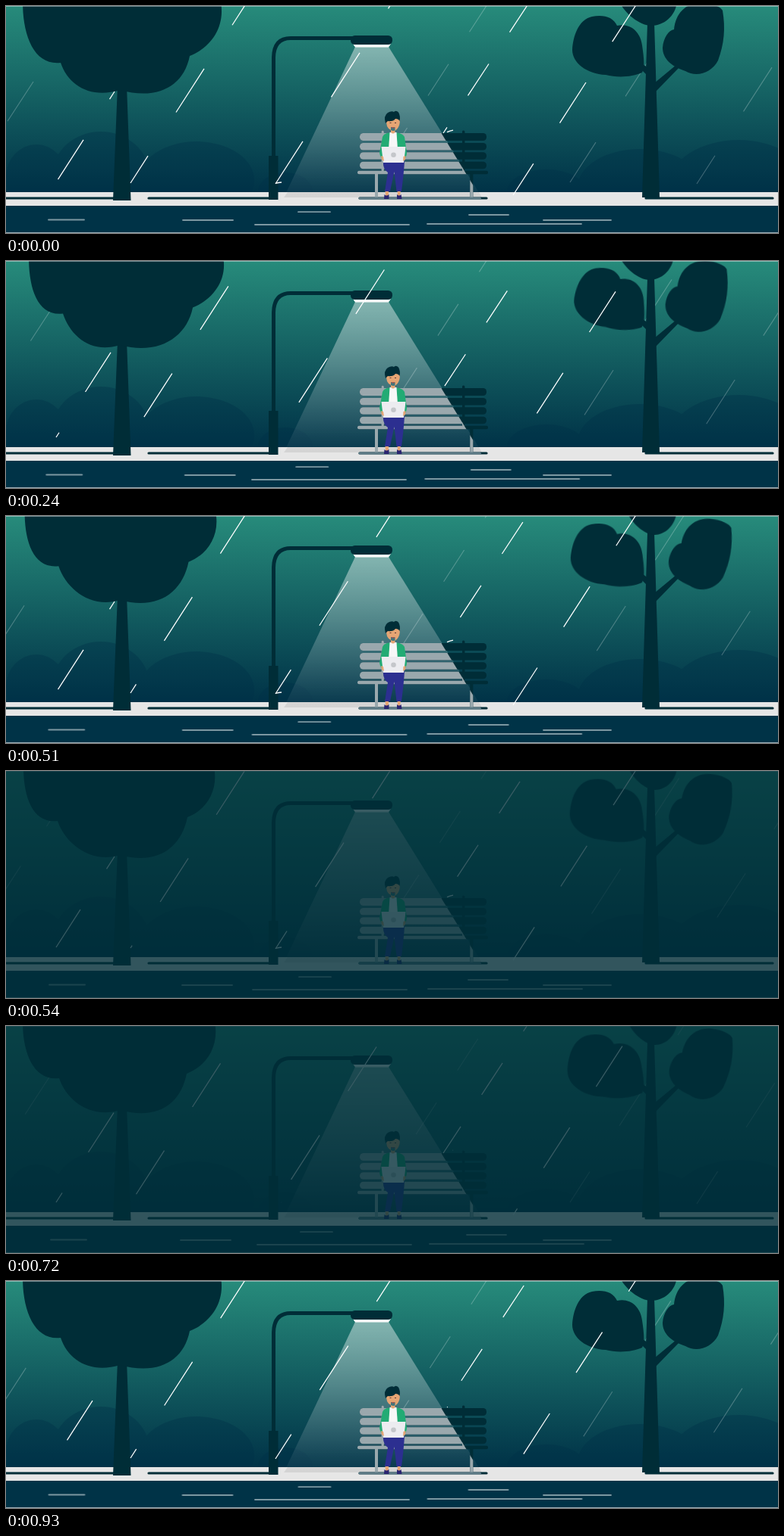
An HTML page for the animation above (960 ms loop, 1017 by 300 pixels).

```html
<!DOCTYPE html>
<html lang="en">
<head>
<meta charset="utf-8">
<title>Rainy evening on a bench</title>
<style>
  html, body { margin: 0; width: 100%; height: 100%; overflow: hidden; background: #003347; }
  svg { display: block; width: 100vw; height: 100vh; }
  .dark { fill: #002d37; }
  .post { fill: none; stroke: #002d37; }
  .bush { fill: #003148; opacity: .38; }

  .drop { fill: none; stroke: #fff; stroke-width: 1.25; animation: fall 960ms steps(32) infinite; }
  .faint .drop { stroke-opacity: .25; stroke-width: 1.1; }
  @keyframes fall { from { stroke-dashoffset: var(--from); } to { stroke-dashoffset: var(--to); } }

  .splash { fill: none; stroke: #fff; stroke-width: 1.3; stroke-dasharray: 9 100; animation: splash 960ms linear infinite; }
  @keyframes splash {
    0%, 50%, 62.5% { stroke-dashoffset: 0; }
    3.1%, 65.6% { stroke-dashoffset: -2; }
    12.5%, 75% { stroke-dashoffset: -8; }
    16%, 78% { stroke-dashoffset: -9; }
    16.01%, 31%, 78.01%, 94% { stroke-dashoffset: 9; }
    37.5% { stroke-dashoffset: 6; }
    96.9%, 99.9% { stroke-dashoffset: 8.2; }
    100% { stroke-dashoffset: 0; }
  }

  .leaf { animation: 960ms linear infinite; }
  #leafLeft { transform-origin: 840px 80px; animation-name: leafLeft; }
  @keyframes leafLeft {
    0%, 96.9%, 100% { transform: rotate(0deg) scale(1); }
    12.5% { transform: rotate(2deg) scale(1); }
    37.5% { transform: rotate(6.5deg) scale(.99); }
    56.25% { transform: rotate(0deg) scale(1.035); }
    65.6%, 75% { transform: rotate(-2deg) scale(1.06); }
  }
  #leafTop { transform-origin: 850px 26px; animation-name: leafTop; }
  @keyframes leafTop {
    0%, 96.9%, 100% { transform: translate(0, 0) scaleX(1); }
    12.5% { transform: translate(-4px, 0) scaleX(1); }
    37.5% { transform: translate(-1px, -2px) scaleX(.9); }
    56.25%, 65.6%, 75% { transform: translate(5px, -1px) scaleX(.87); }
  }
  #leafRight { transform-origin: 880px 85px; animation-name: leafRight; }
  @keyframes leafRight {
    0%, 96.9%, 100% { transform: translate(0, 0) rotate(0deg); }
    12.5% { transform: translate(1px, 1px) rotate(.8deg); }
    37.5% { transform: translate(4px, 4px) rotate(3.5deg); }
    56.25% { transform: translate(6px, 5px) rotate(4.5deg); }
    65.6%, 75% { transform: translate(6px, 4px) rotate(5.2deg); }
  }

  .ripples { stroke: #7d98a2; stroke-width: 1.8; stroke-linecap: round; }
  .ripple { animation: drift 960ms linear infinite; }
  @keyframes drift {
    0%, 100% { transform: translateX(0); }
    12.5% { transform: translateX(calc(var(--way) * -2px)); }
    37.5% { transform: translateX(calc(var(--way) * -3.5px)); }
    56.25% { transform: translateX(calc(var(--way) * 1px)); }
    65.6% { transform: translateX(calc(var(--way) * 3px)); }
    75% { transform: translateX(calc(var(--way) * 3px)); }
    96.9% { transform: translateX(calc(var(--way) * .5px)); }
  }
  .long { animation: driftLong 960ms linear infinite; }
  @keyframes driftLong {
    0%, 96.9%, 100% { transform: translateX(0); }
    12.5% { transform: translateX(-2px); }
    37.5% { transform: translateX(-6px); }
    56.25% { transform: translateX(-3px); }
    65.6% { transform: translateX(-.5px); }
    75% { transform: translateX(3px); }
  }

  #gloom { fill: #002d38; opacity: 0; animation: gloom 960ms step-end infinite; }
  @keyframes gloom {
    0%, 62.5%, 81.25% { opacity: 0; }
    56.25%, 75% { opacity: .78; }
  }
</style>
</head>
<body>
<svg viewBox="0 0 1017 300" preserveAspectRatio="none">
  <defs>
    <linearGradient id="sky" x2="0" y2="1">
      <stop offset="0" stop-color="#278b7b"/>
      <stop offset="1" stop-color="#003247"/>
    </linearGradient>
    <linearGradient id="beam" x2="0" y2="1">
      <stop offset="0" stop-color="#fff" stop-opacity=".45"/>
      <stop offset=".5" stop-color="#fff" stop-opacity=".24"/>
      <stop offset="1" stop-color="#fff" stop-opacity=".03"/>
    </linearGradient>
    <clipPath id="lit"><path d="M460,54H504L627,256H366Z"/></clipPath>
    <g id="bench">
      <rect x="466" y="168" width="167" height="10" rx="4.5"/>
      <rect x="466" y="181" width="167" height="9.5" rx="4.5"/>
      <rect x="466" y="193.3" width="167" height="9.5" rx="4.5"/>
      <rect x="466" y="205.7" width="167" height="9.5" rx="4.5"/>
      <rect x="463" y="217.8" width="172" height="4.4" rx="2"/>
      <rect x="494.5" y="164.5" width="3.4" height="54" rx="1.5"/>
      <rect x="601" y="164.5" width="3.4" height="54" rx="1.5"/>
      <rect x="486" y="221" width="4" height="32"/>
      <rect x="611.3" y="221" width="4" height="32"/>
    </g>
  </defs>

  <rect width="1017" height="247" fill="url(#sky)"/>
  <g class="bush">
    <ellipse cx="40" cy="226" rx="40" ry="43"/>
    <ellipse cx="125" cy="224" rx="64" ry="58"/>
    <ellipse cx="251" cy="230" rx="76" ry="51"/>
    <ellipse cx="368" cy="246" rx="36" ry="26"/>
    <ellipse cx="712" cy="246" rx="52" ry="30"/>
    <ellipse cx="835" cy="240" rx="82" ry="51"/>
    <ellipse cx="965" cy="238" rx="92" ry="61"/>
  </g>

  <rect y="246" width="1017" height="19" fill="#e6e6e6"/>
  <rect y="264" width="1017" height="36" fill="#003347"/>
  <path class="post" stroke-width="3.2" stroke-linecap="round" d="M-3,254H150M188,254H356M466,254H633M843,254H1010"/>

  <g class="ripples" id="ripples"></g>

  <path fill="url(#beam)" d="M460,54H504L627,253H366Z"/>
  <path fill="#000" opacity=".08" d="M371,246H623L627,253H366Z"/>
  <g class="faint" id="faintRain"></g>

  <path class="dark" d="M147,105H159L164.500,257H141Z"/>
  <path class="dark" id="crown"/>

  <path class="dark" d="M845,22H854L861,253H838Z"/>
  <path class="dark" d="M834,73L847,83V94L832,79ZM854,102L884,77L888,80L856,113Z"/>
  <path class="dark leaf" id="leafTop" d="M808,-6C815,10 835,26 850,26C866,26 882,14 884,-6Z"/>
  <path class="dark leaf" id="leafLeft" d="M746,58C747,40 754,18 772,14C786,11 800,14 805,26C822,22 836,34 838,52C840,66 842,80 838,88C825,94 805,95 790,91C765,90 746,75 746,58Z"/>
  <path class="dark leaf" id="leafRight" d="M865,55C866,42 873,32 880,31C882,10 895,-4 915,-4C930,-4 942,1 944,6C948,30 946,50 938,72C930,88 910,95 895,86C877,80 865,70 865,55Z"/>

  <path class="post" stroke-width="5" d="M352.500,200V68Q353,42.500 375,42.500H458"/>
  <rect class="dark" x="346" y="198" width="12.500" height="58"/>
  <path fill="#fff" d="M457,50H507L504,54.500H460Z"/>
  <rect class="dark" x="454" y="39" width="55" height="12" rx="5.500"/>

  <use href="#bench" class="dark"/>
  <g clip-path="url(#lit)">
    <use href="#bench" fill="#9aa8ad"/>
    <path stroke="#5f7c87" stroke-width="3.2" stroke-linecap="round" d="M466,254H633"/>
  </g>

  <g id="person">
    <path fill="#e5a574" d="M499.500,243H504V251H500ZM515.500,243H520L519,251H516Z"/>
    <path fill="#2a2470" d="M498.500,249Q501,252 504.500,249L504.500,255H498ZM515,249Q518,252 520.500,249L521.500,255H515Z"/>
    <path fill="#2c2f90" d="M497,205H525Q524,222 521,245H514.500L511.500,219L506,245H499L503,220Q496,215 497,205Z"/>
    <path fill="#22ab74" d="M505,167.500Q498,168 496,173L492,194Q493,201 498,204H523Q528,200 528,194L525,173Q522,168 515,167.500Z"/>
    <path fill="#f7f7f7" d="M505.500,167H514.500L516,190H504Z"/>
    <path fill="#e5a574" d="M507,160H512.500V167Q510,170 507,167ZM501,149Q500,161 507,164Q513,167 517,160Q520,154 518,147Z"/>
    <path class="dark" d="M500,155Q497,145 503,141Q508,138 511,140Q514,137.500 517,140.500Q520,146 518.500,152Q517,149 513,149Q510,153 503,152Z"/>
    <path stroke="#4a3030" fill="none" stroke-width=".9" d="M505.500,154.500h2M512,154.500h2"/>
    <path stroke="#c44a3f" fill="none" stroke-width="1" d="M508,160.500q2,1 4,0"/>
    <path fill="#ececf0" d="M494.500,186H526.500L524,207H497Z"/>
    <circle cx="510.500" cy="196.700" r="3.300" fill="#c4c6ca"/>
    <path fill="#e5a574" d="M494,198l3,1 1,6-3-2ZM526.500,198l-3,1-.5,6 3-2Z"/>
  </g>

  <g id="rain"></g>
  <path class="splash" d="M355,234.500Q359,233.300 363,233"/>
  <path class="splash" d="M581,166.700Q585,165 589,164.200"/>

  <rect width="1017" height="1" fill="#fff" opacity=".45"/>
  <rect y="299" width="1017" height="1" fill="#fff" opacity=".6"/>
  <rect id="gloom" width="1017" height="300"/>
</svg>
<script>
const STEPS = 32, DURATION = 960;
const byId = id => document.getElementById(id);

function add(parent, name, attrs) {
  const el = document.createElementNS("http://www.w3.org/2000/svg", name);
  for (const key in attrs) el.setAttribute(key, attrs[key]);
  byId(parent).append(el);
  return el;
}

// Each lane is a dashed line; top, speed, period and dash are measured along x.
function lane(parent, x1, y1, x2, y2, top, speed, period, dash) {
  const scale = Math.hypot(x2 - x1, y2 - y1) / (x1 - x2);
  const offset = step => -(x1 - top + speed * step) * scale;
  add(parent, "path", {
    class: "drop",
    d: `M${x1},${y1}L${x2},${y2}`,
    "stroke-dasharray": `${dash * scale} ${(period - dash) * scale}`,
    style: `--from:${offset(0)}px;--to:${offset(STEPS)}px`
  });
}

lane("rain", 507, -2, 355, 235, 466, 5.33, 75, 37.5);
lane("rain", 315.5, -2, 164, 234, 261, 5.27, 74, 37);
lane("rain", 143, 113, 66, 233, 102, 4, 68, 33.5);
lane("rain", 687.5, -2, 576, 168, 636, 3.83, 55, 27.5);
lane("rain", 830.4, -2, 668, 250, 764, 3.77, 69.2, 34.5);
lane("faintRain", 62, 60, -3, 160, 36, 4.7, 68, 34);
lane("faintRain", 634, -2, 524, 168, 583, 5.2, 54.5, 27);
lane("faintRain", 894, -2, 743, 233, 777, 6.75, 77, 38);
lane("faintRain", 1020, 64, 910, 235, 934, 6.1, 75, 37.5);

// x, y, width, drift direction (0 = still)
[[55, 282.5, 49, 1], [232, 283, 68, -1], [384, 272.2, 44, 1], [554, 288, 205, 1],
 [609, 276, 54, -1], [707, 283, 91, 0]].forEach(([x, y, w, way]) =>
  add("ripples", "path", { class: "ripple", d: `M${x + 1},${y}h${w - 2}`, style: `--way:${way}` }));
add("ripples", "path", { class: "long", d: "M328,289h203" });

// Left edge, left notch, right edge and right notch shape the crown.
const crown = (left, nx, ny, right, sx, sy) => `path("M${left},-5
  C${left},${ny - 34} ${nx - 34},${ny + 4} ${nx},${ny}
  C${nx + 10},${ny + 30} 112,123 150,111
  C200,125 ${sx - 8},${sy + 40} ${sx},${sy}
  C${sx + 26},${sy - 10} ${right + 6},${sy - 36} ${right},-5Z")`.replace(/\s+/g, " ");

const rest = [22, 72, 75, 283, 242, 66];
const sway = [
  [0, rest],
  [4, [27, 74, 72, 285, 244, 64]],
  [12, [33, 76, 67, 287, 248, 59]],
  [18, [23, 68, 66, 274, 239, 61]],
  [21, [21, 67, 66, 274, 238, 60]],
  [24, [22, 70, 69, 275, 238, 63]],
  [31, rest],
  [32, rest]
];
byId("crown").animate(
  sway.map(([step, shape]) => ({ offset: step / STEPS, d: crown(...shape) })),
  { duration: DURATION, iterations: Infinity });
</script>
</body>
</html>
```
